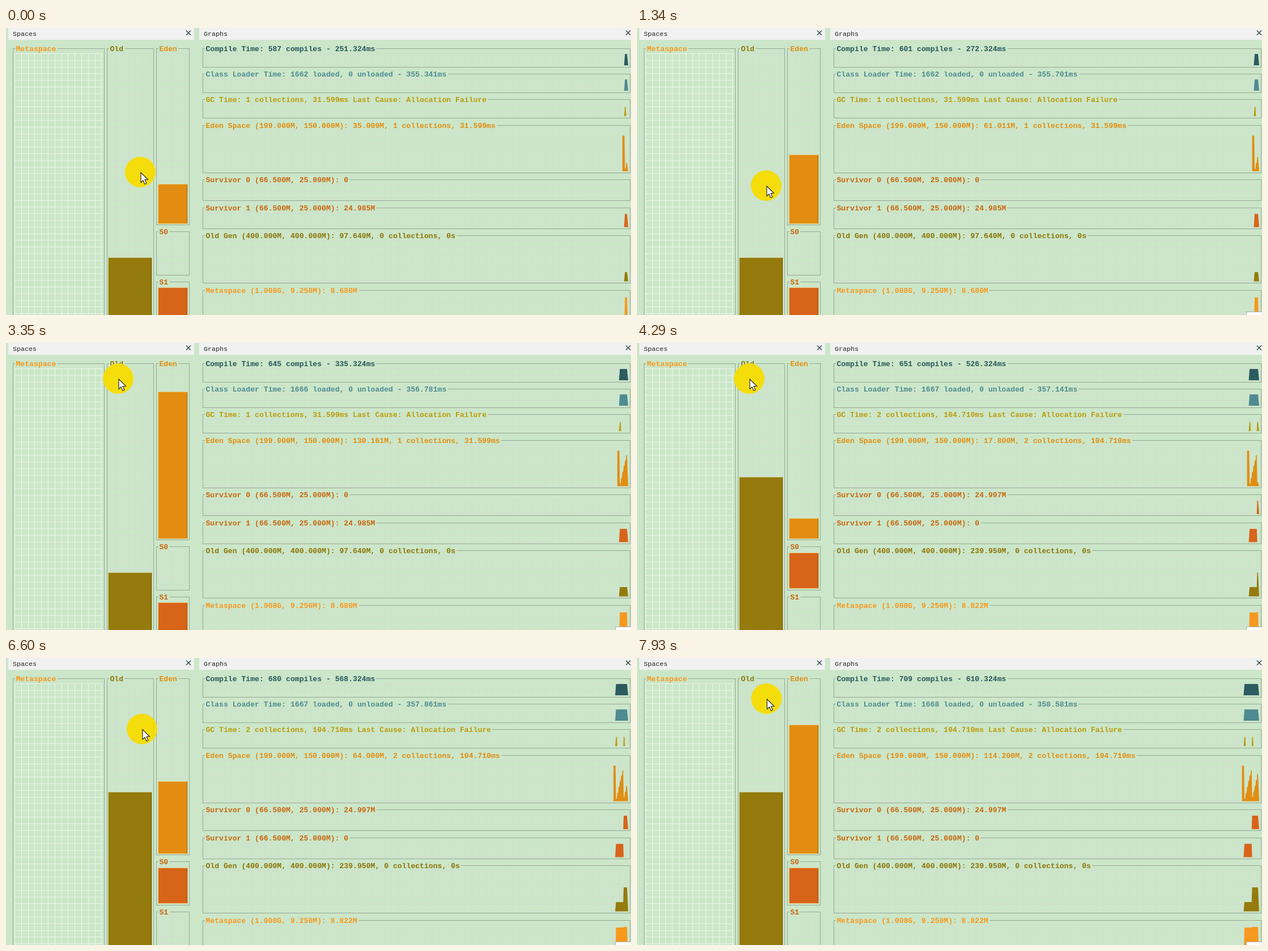
Write an HTML page with a canvas that moves like this. It is 1103 px wide and 508 px high and loops after 8 s.

```html
<!DOCTYPE html>
<html lang="en">
<head>
<meta charset="utf-8">
<title>Heap monitor</title>
<style>
html, body { margin: 0; width: 100%; height: 100%; overflow: hidden; background: #cbe6c8; }
canvas { display: block; }
</style>
</head>
<body>
<canvas id="stage" width="1103" height="508"></canvas>
<script>
const W = 1103, H = 508, LOOP = 8000;
const CELL = 11.8;      // grid pitch
const SAMPLE = 2.25;    // graph pixels per sample
const NOW_X = 1095.3;   // x of the newest sample
const SECOND_GC = 5;    // sample at which the heap is collected
const TITLE_FONT = 'bold 13.12px "Liberation Mono", monospace';
const HEADER_FONT = '11.65px "Liberation Mono", monospace';
const ctx = document.getElementById('stage').getContext('2d');

const C = {
  bg: '#cbe6c8', header: '#f0f1f0', line: '#98a698', grid: '#d3ddd1',
  compile: '#2c5b60', loader: '#4f8b92', gc: '#bd9a0c', eden: '#e28d12',
  surv: '#d8641a', survText: '#c9660f', old: '#957b0d', oldText: '#8d7408', meta: '#f7981f'
};

// start, end and destination of each pointer move
const moves = [
  [70, 190, 222, 336],
  [390, 390, 234, 194],
  [660, 660, 223, 312],
  [920, 1340, 228, 279],
  [1740, 2220, 284, 134],
  [2550, 3020, 198, 63],
  [6270, 6730, 261, 157],
  [6930, 7260, 242, 160],
  [7470, 7930, 228.5, 72]
];

function pointerAt(t) {
  let x = 237, y = 255;
  for (const [start, end, toX, toY] of moves) {
    if (t < start) break;
    const steps = 1 + Math.round((end - start) / 90);
    const gap = (end - start) / (steps - 1) || 1;
    const p = Math.min(steps, Math.floor((t - start) / gap + 1e-6) + 1) / steps;
    x += (toX - x) * p;
    y += (toY - y) * p;
  }
  return [x, y];
}

// the sampler stalls once, then ticks evenly
function sampleAt(t) {
  if (t < 190) return 0;
  return t < 1700 ? 1 : 2 + Math.floor((t - 1700) / 825);
}

// Eden fills steadily and is emptied by a collection
function edenAt(n) {
  if (n === -1) return 10;
  if (n < 0) return 150;
  const m = n - SECOND_GC;
  return m < 0 ? 35.009 + 26.74 * n - .738 * n * n : 17.8 + 22.1 * m + .5 * m * m;
}

function rect(x, y, w, h, color) {
  ctx.fillStyle = color;
  ctx.fillRect(x, y, w, h);
}

function write(str, x, y, color, font) {
  ctx.font = font;
  ctx.fillStyle = color;
  ctx.fillText(str, x, y);
}

function grid(x0, y0, x1, y1, color) {
  for (let x = x0; x <= x1; x += CELL) rect(Math.round(x), y0, 1, y1 - y0, color);
  for (let y = y0; y <= y1; y += CELL) rect(x0, Math.round(y), x1 - x0, 1, color);
}

function titledBox(x, y, x1, y1, title, color, gridColor = C.grid) {
  grid(x + 3, y + 9, x1 - 2, y1 - 2, gridColor);
  ctx.strokeStyle = C.line;
  ctx.lineWidth = 1;
  ctx.strokeRect(x + .5, y + .5, x1 - x, y1 - y);
  ctx.font = TITLE_FONT;
  rect(x + 4, y - 1, ctx.measureText(title).width + 4, 4, C.bg);
  write(title, x + 5.5, y + 4.5, color, TITLE_FONT);
}

function bar(x, y, x1, y1, color, rim, dark) {
  rect(x - 1, y - 1, x1 - x + 2, y1 - y + 2, rim);
  rect(x, y, x1 - x, y1 - y, color);
  rect(x1 - 1, y, 1, y1 - y, dark);
}

// height(i) for samples from first to n, drawn as narrow steps
function plot(n, base, color, height, first = -1) {
  const xOf = i => NOW_X - (n - i) * SAMPLE;
  ctx.beginPath();
  ctx.moveTo(xOf(first) - (first < -1 ? .7 : SAMPLE), base);
  for (let i = first; i <= n; i++) {
    ctx.lineTo(xOf(i) - .7, base - height(i));
    ctx.lineTo(xOf(i) + .7, base - height(i));
  }
  ctx.lineTo(1098, base);
  ctx.fillStyle = color;
  ctx.fill();
}

function header(x, x1, title, closeX) {
  rect(x, 0, x1 - x, 21, C.header);
  write(title, x + 8, 13.5, '#222', HEADER_FONT);
  ctx.strokeStyle = '#35504f';
  ctx.lineWidth = 1.6;
  ctx.beginPath();
  for (const s of [-1, 1]) {
    ctx.moveTo(closeX - 4, 8.5 - 4 * s);
    ctx.lineTo(closeX + 4, 8.5 + 4 * s);
  }
  ctx.stroke();
}

function spaces(n, after) {
  titledBox(12, 36, 173, 540, 'Metaspace', C.meta, '#edf6eb');
  titledBox(178, 36, 260, 540, 'Old', C.oldText);
  titledBox(265, 36, 323, 348, 'Eden', C.eden);
  titledBox(265, 360, 323, 437, 'S0', C.survText);
  titledBox(265, 449, 323, 540, 'S1', C.survText);
  bar(181, after ? 238 : 407, 257, 540, C.old, '#c9c37c', '#6b5910');
  bar(269, Math.round(346.5 - edenAt(n) * 1.995), 320, 346, C.eden, '#e6cf7c', '#96621a');
  const top = after ? 372 : 460;
  bar(269, top, 320, top + 62, C.surv, '#e6cf7c', '#944a18');
}

function graphs(n, after) {
  const compiles = Math.floor(587 + 14.5 * n - 8 * after);
  const compileMs = (251.324 + 21 * n + 170 * after).toFixed(3);
  const classes = 1662 + 4 * (n > 1) + after + (n > 8);
  const loaderMs = (355.341 + .36 * n).toFixed(3);
  const gcInfo = after ? '2 collections, 104.710ms' : '1 collections, 31.599ms';
  const surv = used => `(66.500M, 25.000M): ${used}`;
  const box = (y, y1, title, color) => titledBox(347, y, 1101, y1, title, color);

  box(36, 69, `Compile Time: ${compiles} compiles - ${compileMs}ms`, '#28575c');
  box(81, 114, `Class Loader Time: ${classes} loaded, 0 unloaded - ${loaderMs}ms`, C.loader);
  box(126, 159, `GC Time: ${gcInfo} Last Cause: Allocation Failure`, C.gc);
  box(172, 256, `Eden Space (199.000M, 150.000M): ${edenAt(n).toFixed(3)}M, ${gcInfo}`, C.eden);
  box(268, 305, 'Survivor 0 ' + surv(after ? '24.997M' : '0'), C.survText);
  box(318, 355, 'Survivor 1 ' + surv(after ? '0' : '24.985M'), C.survText);
  box(367, 451, `Old Gen (400.000M, 400.000M): ${after ? '239.950M' : '97.640M'}, 0 collections, 0s`, C.oldText);
  box(464, 550, `Metaspace (1.008G, 9.250M): ${after ? '8.822M' : '8.680M'}`, C.meta);

  const split = (before, later) => i => i < SECOND_GC ? before : later;
  plot(n, 66, C.compile, () => 20);
  plot(n, 111, C.loader, () => 20);
  plot(n, 156, C.gc, i => i === -1 || i === SECOND_GC ? 16.5 : 0);
  plot(n, 253.5, C.eden, i => edenAt(i) * .42, -3);
  plot(n, 303, C.surv, split(0, 24));
  plot(n, 352.5, C.surv, split(23.5, 0));
  plot(n, 448.5, C.old, split(16.5, 42.5));
  plot(n, 547, C.meta, split(70, 71));
}

function pointer(x, y) {
  ctx.fillStyle = 'rgba(248,222,0,.94)';
  ctx.beginPath();
  ctx.arc(x, y, 27, 0, Math.PI * 2);
  ctx.fill();
  const shape = [[0, 0], [0, 17.5], [4, 13.8], [7, 20.5], [10, 19], [7, 12.6], [12.5, 12.3]];
  ctx.beginPath();
  shape.forEach(([dx, dy]) => ctx.lineTo(x + 1 + dx, y + 1 + dy));
  ctx.closePath();
  ctx.fillStyle = '#fff';
  ctx.fill();
  ctx.strokeStyle = '#26282c';
  ctx.lineWidth = 1.2;
  ctx.stroke();
}

function draw(t) {
  const n = sampleAt(t);
  const after = n >= SECOND_GC;
  rect(0, 0, W, H, C.bg);
  header(4, 332, 'Spaces', 322);
  header(341, W, 'Graphs', 1098);
  spaces(n, after);
  graphs(n, after);
  if (t >= 1130) {
    rect(1075, 502, 28, 6, '#a9b0a8');
    rect(1076, 503, 27, 5, '#fff');
  }
  pointer(...pointerAt(t));
}

const begin = performance.now();
function tick() {
  draw((performance.now() - begin) % LOOP);
  requestAnimationFrame(tick);
}
tick();
</script>
</body>
</html>
```
